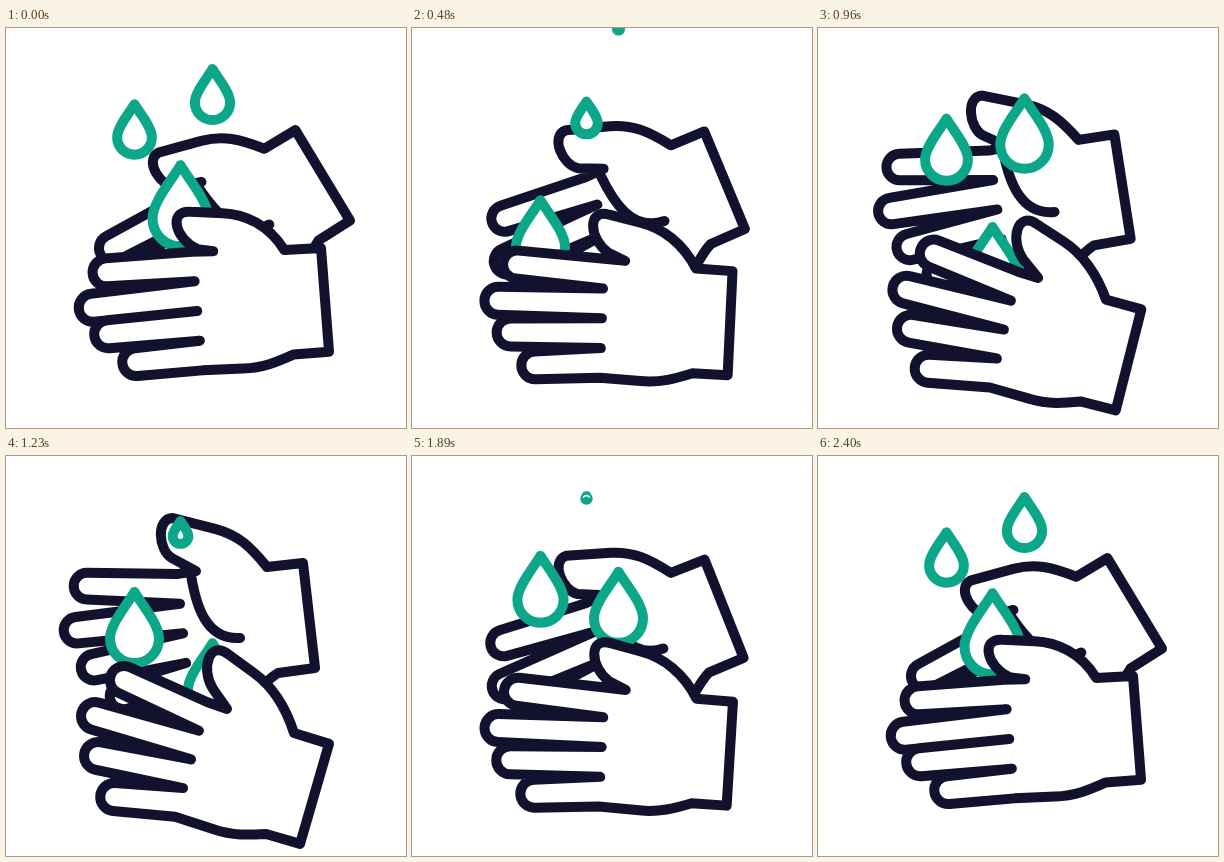
These frames come from a looping animation (400 px wide and 400 px high, 2.43 s). An HTML page:

```html
<!DOCTYPE html>
<html lang="en">
<head>
<meta charset="utf-8">
<title>Hand washing</title>
<style>
  html, body { margin: 0; width: 100%; height: 100%; overflow: hidden; background: #fff; }
  svg { display: block; width: 100vw; height: 100vh; }
  path { fill: #fff; stroke: #12122f; stroke-width: 10; stroke-linecap: round; stroke-linejoin: round; }
  .drop { stroke: #0ca789; }
  .line { fill: none; }
</style>
</head>
<body>
<svg viewBox="0 0 400 400">
  <g id="back">
    <path/>
    <path class="line" d="M185 119C190 150 200 184 234 182"/>
  </g>
  <g id="drops"></g>
  <g id="front"><path/></g>
</svg>
<script>
const LOOP = 2430, CYCLE = 2400, STEP = 30;
const $ = id => document.getElementById(id);

// Hands are described fully opened. Closing turns the hand about its pivot,
// fans the fingers together about their knuckles and bends the thumb.
const hands = [
  {
    id: 'front', pivot: [132, 276], turn: 20.6, radius: 14, fan: 6, rest: 1.33, bend: -13,
    crotch: [221, 253], knuckle: [201, 246], step: [-8, 28.7],
    tips: [[118, 224], [89, 260], [92, 300], [108, 341]],
    heel: [[207.6, 373.3], [227, 380], [243, 379], [260, 378]],
    cuff: [[294, 388], [323, 288], [288, 277]],
    thumbPivot: [262, 240],
    thumb: [[280, 252], [266, 230], [248, 217], [222, 198], [204, 184], [194, 212], [207, 233]]
  },
  {
    id: 'back', pivot: [282, 122], turn: 24.6, radius: 13.3, fan: 2.5, rest: 2, bend: -5,
    crotch: [190, 115], knuckle: [171, 118], step: [3, 29.6],
    tips: [[81, 130], [71, 174], [88, 211], [117, 240]],
    heel: [[220, 255], [240, 255], [250, 230], [272, 217]],
    cuff: [[309, 212], [297, 107], [261, 111]],
    thumbPivot: [261, 111],
    thumb: [[244, 90], [232, 79], [210, 73], [167, 62], [150, 62], [152, 94], [166, 102]]
  }
];

function rotate([x, y], [cx, cy], deg) {
  const r = deg * Math.PI / 180, c = Math.cos(r), s = Math.sin(r);
  return [cx + (x - cx) * c - (y - cy) * s, cy + (x - cx) * s + (y - cy) * c];
}

const text = pts => pts.map(p => p[0].toFixed(2) + ' ' + p[1].toFixed(2)).join(' ');
const line = (...pts) => 'L' + text(pts);
const curve = (...pts) => 'C' + text(pts);

function finger(hand, i, closed) {
  const { knuckle: [kx, ky], step: [sx, sy], radius: r } = hand;
  const at = n => [kx + sx * n, ky + sy * n];
  const mid = at(i + 0.5);
  const [x, y] = rotate(hand.tips[i], mid, hand.fan * (i - hand.rest) * closed);
  const len = Math.hypot(mid[0] - x, mid[1] - y);
  const nx = (mid[1] - y) / len * r, ny = (x - mid[0]) / len * r;
  return line(at(i), [x + nx, y + ny]) + `A${r} ${r} 0 0 0 ` + text([[x - nx, y - ny]]) + line(at(i + 1));
}

function drawHand(hand, closed) {
  const { id, pivot, turn, crotch, tips, heel, cuff, thumb, thumbPivot, bend } = hand;
  const th = thumb.map(p => rotate(p, thumbPivot, bend * closed));
  const d = 'M' + text([crotch])
    + tips.map((_, i) => finger(hand, i, closed)).join('')
    + line(heel[0]) + curve(...heel.slice(1)) + line(...cuff)
    + curve(...th.slice(0, 3)) + line(th[3]) + curve(...th.slice(4)) + 'Z';
  $(id).firstElementChild.setAttribute('d', d);
  $(id).setAttribute('transform', `rotate(${-turn * closed} ${pivot})`);
}

// Each drop falls three times: y + speed * s + surge * s^3, where s is the time
// from `first`, repeated every `gap`. It swells between the heights in `grow`.
const drops = [
  { x: 128.5, y: 125, speed: .11, surge: 1.45e-6, first: 160, gap: 830, grow: [5, 155], width: 59 },
  { x: 174.5, y: 42, speed: .235, surge: 1.2e-7, first: 280, gap: 805, grow: [22, 178], width: 66 },
  { x: 206.5, y: 46, speed: .19, surge: 4.9e-7, first: -105, gap: 800, grow: [-20, 113], width: 59 }
];
for (const drop of drops) {
  drop.el = document.createElementNS('http://www.w3.org/2000/svg', 'path');
  drop.el.setAttribute('class', 'drop');
  $('drops').append(drop.el);
}

function dropShape(x, y, width) {
  const r = (width - 10) / 2;
  const at = (px, py) => [x + px * r, y + py * r];
  return 'M' + text([at(0, -1.45)])
    + curve(at(-.25, -1), at(-1, -.15), at(-1, .45))
    + curve(at(-1, 1.02), at(-.55, 1.45), at(0, 1.45))
    + curve(at(.55, 1.45), at(1, 1.02), at(1, .45))
    + curve(at(1, -.15), at(.25, -1), at(0, -1.45)) + 'Z';
}

function drawDrop({ el, x, y, speed, surge, first, gap, grow: [top, full], width }, t) {
  let d = '';
  for (const now of [t, t + CYCLE]) {
    for (let i = 0; i < 3; i++) {
      const s = now - first - i * gap;
      const cy = y + speed * s + surge * s ** 3;
      const u = Math.min(Math.max((cy - top) / (full - top), 0), 1);
      const w = 10 + (width - 10) * u * u * (3 - 2 * u);
      if (w > 12.2 && cy < 285) d += dropShape(x, cy, w);
    }
  }
  el.setAttribute('d', d);
}

function draw(ms) {
  const t = Math.floor(ms % LOOP / STEP) * STEP % CYCLE;
  const closed = (1 + Math.cos(2 * Math.PI * t / CYCLE)) / 2;
  hands.forEach(hand => drawHand(hand, closed));
  drops.forEach(drop => drawDrop(drop, t));
}

let start;
function tick(now) {
  if (start === undefined) start = now;
  draw(Math.max(now - start, 0));
  requestAnimationFrame(tick);
}
draw(0);
requestAnimationFrame(tick);
</script>
</body>
</html>
```
